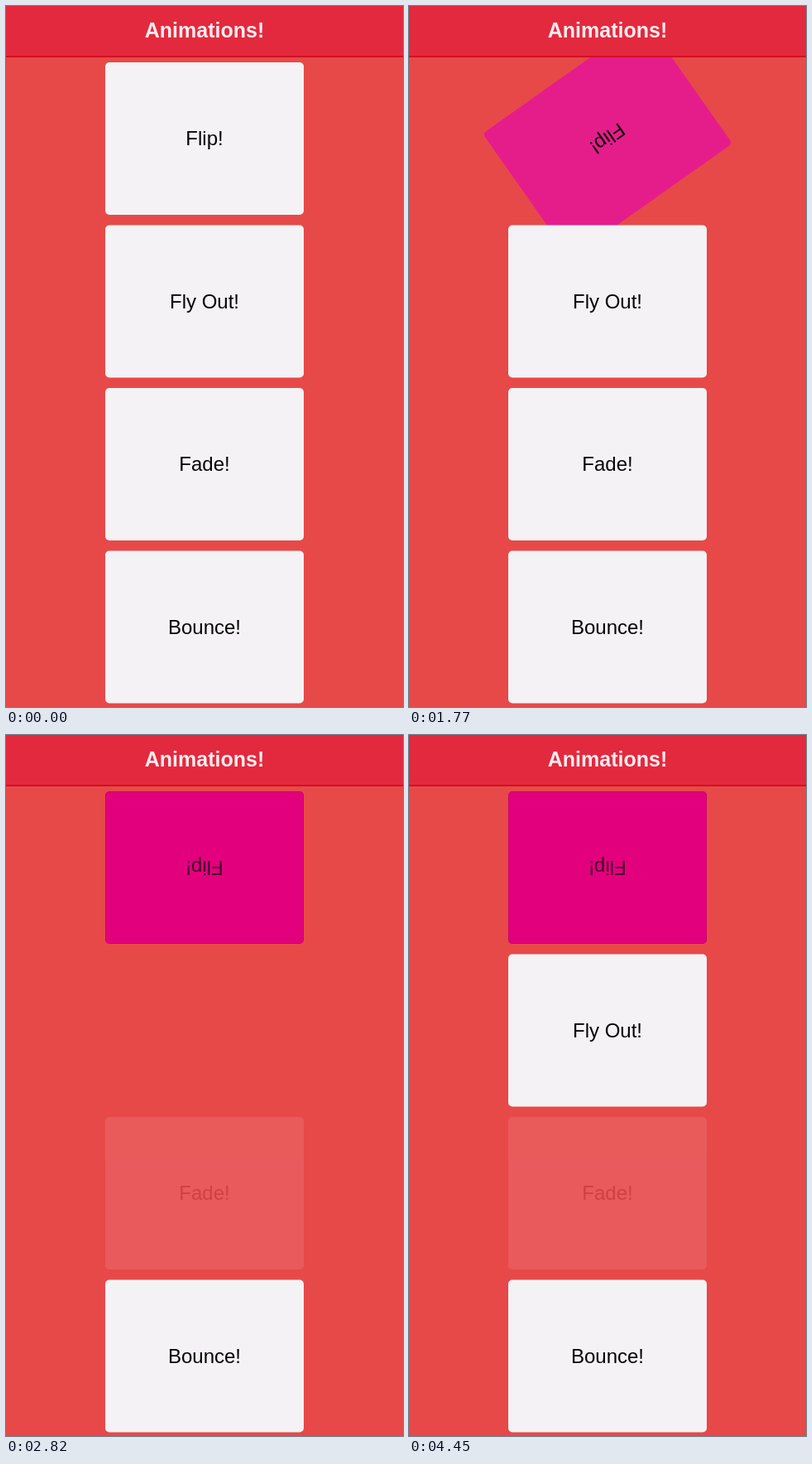
Write an HTML page that moves like this. It is 480 px wide and 846 px high and loops after 4490 ms.

```html
<!DOCTYPE html>
<html lang="en">
<head>
<meta charset="utf-8">
<title>Animations!</title>
<style>
  html, body { margin: 0; width: 100%; height: 100%; overflow: hidden; background: #e74949; }
  svg { display: block; width: 100vw; height: 100vh; }
  text { font-family: "Liberation Sans", Arial, sans-serif; text-anchor: middle; }
  .card text { font-size: 24px; fill: #050505; }
</style>
</head>
<body>
<svg id="stage" viewBox="0 0 480 846">
  <rect width="480" height="846" fill="#e74949"/>
  <g id="cards"></g>
  <rect width="480" height="61" fill="#e3293e"/>
  <rect y="60" width="480" height="2" fill="#d50f20"/>
  <text x="240" y="37.5" font-size="25" font-weight="bold" fill="#fcecee">Animations!</text>
</svg>
<script>
const NS = 'http://www.w3.org/2000/svg';
const LOOP = 4490, STEP = LOOP / 99;
const CX = 240, TOP = 160, PITCH = 196.5, W = 240, H = 184;
const WHITE = [244, 242, 244], PINK = [227, 0, 125];
const INK = [5, 5, 5], PLUM = [62, 6, 40];

function add(parent, tag, attrs) {
  const el = document.createElementNS(NS, tag);
  for (const k in attrs) el.setAttribute(k, attrs[k]);
  return parent.appendChild(el);
}

function makeCard(label, i) {
  const g = add(document.getElementById('cards'), 'g', { class: 'card' });
  const box = add(g, 'rect', { x: -W / 2, y: -H / 2, width: W, height: H, rx: 5, fill: '#f4f2f4' });
  const text = add(g, 'text', { x: 0, y: 8.3 });
  text.textContent = label;
  return { g, box, text, y: TOP + i * PITCH };
}

const [flip, fly, fade, bounce] = ['Flip!', 'Fly Out!', 'Fade!', 'Bounce!'].map(makeCard);
const edge = add(flip.g, 'rect', {
  x: -W / 2 + .5, y: -H / 2 + .5, width: W - 1, height: H - 1, rx: 4.5,
  fill: 'none', stroke: '#c9006c'
});

const clamp = v => Math.min(1, Math.max(0, v));
const part = (t, start, length) => clamp((t - start) / length);
const mix = (a, b, p) => a + (b - a) * p;
const rgb = (a, b, p) => `rgb(${a.map((v, i) => Math.round(mix(v, b[i], p)))})`;

// cubic-bezier(.42, 0, .58, 1), solved for x by bisection
function ease(x) {
  if (x <= 0 || x >= 1) return clamp(x);
  let lo = 0, hi = 1;
  for (let i = 0; i < 24; i++) {
    const s = (lo + hi) / 2, r = 1 - s;
    if (3 * r * r * s * .42 + 3 * r * s * s * .58 + s * s * s < x) lo = s;
    else hi = s;
  }
  return lo * lo * (3 - 2 * lo);
}

// quick squeeze, then a damped spring back to full size
function bounceScale(t) {
  const start = 3080, squeeze = 150, depth = .15;
  if (t < start + squeeze) return 1 - depth * ease(part(t, start, squeeze));
  const s = (t - start - squeeze) / 1000;
  return s > .7 ? 1 : 1 - depth * Math.exp(-9 * s) * Math.cos(12 * s);
}

function place(card, dx = 0, extra = '') {
  card.g.setAttribute('transform', `translate(${CX + dx} ${card.y}) ${extra}`);
}

function draw(t) {
  const turn = ease(part(t, 1422, 500));
  const tint = 1 - Math.pow(1 - turn, 1.3);
  place(flip, 0, `rotate(${180 * turn})`);
  flip.box.setAttribute('fill', rgb(WHITE, PINK, tint));
  flip.text.style.fill = rgb(INK, PLUM, part(turn, .85, .15));
  edge.setAttribute('opacity', part(turn, .9, .1));

  const away = ease(part(t, 2140, 260)) - ease(part(t, 4020, 390));
  place(fly, 400 * away);

  place(fade);
  fade.g.setAttribute('opacity', mix(1, .1, ease(part(t, 2440, 350))));

  place(bounce, 0, `scale(${bounceScale(t)})`);
}

function tick() {
  const t = performance.now() % LOOP;
  draw(Math.floor(t / STEP) * STEP);
  requestAnimationFrame(tick);
}
tick();
</script>
</body>
</html>
```
